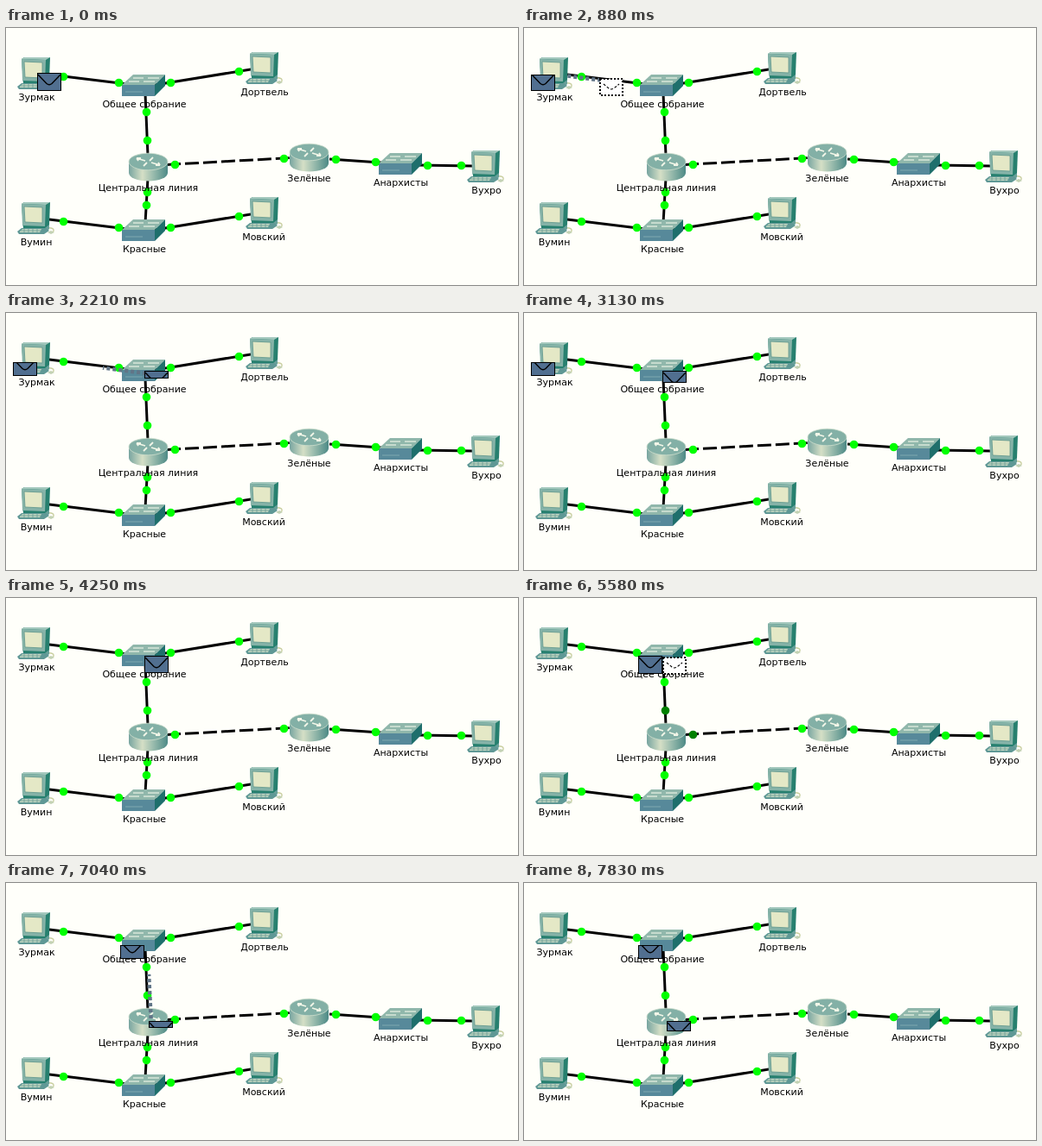
Recreate the animation shown at these times as an HTML page. Size 592 px wide and 298 px high, loop 8 s.

```html
<!DOCTYPE html>
<html lang="ru">
<head>
<meta charset="utf-8">
<style>
html, body { margin: 0; width: 100%; height: 100%; overflow: hidden; background: #fffffa; }
svg { display: block; width: 592px; height: 298px; }
text { font: 11px "DejaVu Sans", sans-serif; text-anchor: middle; fill: #000; }
</style>
</head>
<body>
<svg id="stage" viewBox="0 0 592 298">
  <defs>
    <linearGradient id="metal">
      <stop offset="0" stop-color="#78a5a0"/>
      <stop offset=".35" stop-color="#d5dfc6"/>
      <stop offset=".6" stop-color="#9fbfb0"/>
      <stop offset="1" stop-color="#4d8a86"/>
    </linearGradient>
    <g id="pc">
      <path d="M34 30Q41 29 42 32T37 35" fill="none" stroke="#c9cfa0" stroke-width="1.4"/>
      <path d="M35 35L39 33L43 35L39 37Z" fill="#c3d2b4"/>
      <path d="M6 26H37V31L33 35H10Z" fill="#68a09a"/>
      <path d="M5 2L8 0H38L37 26L32 30H7Z" fill="#27806f"/>
      <path d="M5 2L8 0H38L33 3Z" fill="#a4c8bd"/>
      <path d="M5 2L33 3L32 28L6 27Z" fill="#86b3a8"/>
      <path d="M8 5L29 6V24L9 23Z" fill="#e4e8c6" stroke="#5f968c" stroke-width=".8"/>
      <path d="M0 34L5 30H33L37 33L31 37H2Z" fill="#5f9895"/>
      <path d="M3 34L6 31H28L26 35H3Z" fill="#bfd5c0"/>
      <path d="M4 33H27M8 31V35M13 31V35M18 31V35M23 31V35" stroke="#5f9691" stroke-width=".7"/>
    </g>
    <g id="switch">
      <path d="M0 12L13 0H50L38 12Z" fill="#90b7ab"/>
      <path d="M0 12H38V25H0Z" fill="#57899a"/>
      <path d="M38 12L50 0V13L38 25Z" fill="#1f6f6c"/>
      <path d="M13 4H25M30 4H43M8 8H20M25 8H38" stroke="#d9e8da" stroke-width="1.3"/>
      <path d="M4 20H24" stroke="#7fa9b0"/>
    </g>
    <g id="router">
      <path d="M0 10V23A22.5 9.5 0 0 0 45 23V10Z" fill="url(#metal)"/>
      <ellipse cx="22.5" cy="10" rx="22.5" ry="9.8" fill="#83b0a6" stroke="#cfdfcd" stroke-width=".8"/>
      <path d="M9 6L19 9M36 14L26 11M17 15L21 11M28 5L24 9M9 6H14M9 6L11 9M36 14H31M36 14L34 11" fill="none" stroke="#f2f6e8" stroke-width="1.8"/>
    </g>
  </defs>
  <rect width="592" height="298" fill="#fffffa"/>
  <g id="net"></g>
  <g id="labels"></g>
  <path id="trail" fill="none" stroke="#617587" stroke-width="4.5" stroke-dasharray="4 3"/>
  <g id="ghost">
    <rect x="1" y="1" width="26" height="19" fill="#fff" stroke="#000" stroke-width="2" stroke-dasharray="2 2"/>
    <path d="M5 7L11 12Q14 14 17 12L23 7" fill="none" stroke="#000" stroke-width="1.1" stroke-dasharray="3 2"/>
  </g>
</svg>
<script>
const NS = 'http://www.w3.org/2000/svg';
const LOOP = 8000, TRAVEL = 1060, FILL = 3950, W = 28, H = 21;
const $ = id => document.getElementById(id);

function add(parent, tag, attrs) {
  const el = document.createElementNS(NS, tag);
  set(el, attrs);
  return parent.appendChild(el);
}
function set(el, attrs) {
  for (const k in attrs) el.setAttribute(k, attrs[k]);
}
const show = (el, on) => set(el, { visibility: on ? 'visible' : 'hidden' });
const clamp = v => Math.max(0, Math.min(1, v));
const mix = (a, b, p) => a + (b - a) * p;

// Network map
const net = $('net');
const links = ['M46 53.500L140 65', 'M172 66L286 47.500', 'M161 76L164 148', 'M164 174L161 226',
  'M46 221.500L140 233', 'M172 234L286 215.500', 'M374 152L440 156.500', 'M476 159L540 160'];
add(net, 'path', { d: links.join(''), stroke: '#000', 'stroke-width': 3 });
add(net, 'path', { d: 'M186 158.500L330 150.500', stroke: '#000', 'stroke-width': 3, 'stroke-dasharray': '16 5' });

const devices = {
  pc: [[13, 34], [277, 28], [533, 142], [13, 202], [277, 196]],
  switch: [[134, 54], [431, 145], [134, 222]],
  router: [[142, 145], [328, 134]]
};
for (const kind in devices)
  for (const [x, y] of devices[kind]) add(net, 'use', { href: '#' + kind, x, y });

const lamps = [[163, 130], [195, 158], [66, 56], [130, 63], [190, 63], [269, 50], [162, 97],
  [321, 151], [381, 152], [427, 155], [487, 159], [526, 159], [163, 190], [162, 205],
  [130, 231], [66, 224], [190, 231], [269, 218]
].map(([x, y]) => add(net, 'circle', { cx: x + .5, cy: y + .5, r: 4.8, fill: '#0f0' }));

const names = [['Зурмак', 35.5, 84], ['Общее собрание', 160, 92], ['Дортвель', 299, 78],
  ['Центральная линия', 164.5, 189], ['Зелёные', 350.5, 178], ['Анархисты', 456.5, 183],
  ['Вухро', 555.5, 192], ['Вумин', 35, 252], ['Красные', 160, 260], ['Мовский', 298, 246]];
for (const [name, x, y] of names) add($('labels'), 'text', { x, y }).textContent = name;

// Envelope of which only the rows from top to bottom are visible
function envelope() {
  const box = add($('stage'), 'svg', { width: W, overflow: 'hidden' });
  const face = add(box, 'rect', { x: .5, width: W - 1, fill: '#516f90', stroke: '#000' });
  add(box, 'path', { d: 'M1 2L11 12.500Q14 15 17 12.500L27 2', fill: 'none', stroke: '#000', 'stroke-width': 1.4 });
  return (x, y, top, bottom) => {
    const h = bottom - top;
    show(box, h >= 1);
    if (h < 1) return;
    set(box, { x, y: y + top, height: h, viewBox: `0 ${top} ${W} ${h}` });
    set(face, { y: top + .5, height: h - 1 });
  };
}
const sender = envelope(), receiver = envelope();
$('stage').append($('ghost'));

const hops = [
  { start: 515, from: [36, 52], to: [160, 67], wire: [50, 55.5, 162, 70] },
  { start: 5575, from: [160, 67], to: [165, 160], wire: [163.5, 74, 168, 164] }
];
const glide = u => 1 - Math.pow(1 - clamp(u), 1.25);

function draw(t) {
  const hop = t < 5040 ? hops[0] : hops[1];
  const age = t - hop.start;
  const [x0, y0] = hop.from, [x1, y1] = hop.to;
  const moving = age >= 0 && age < TRAVEL;
  const head = glide(age / TRAVEL);
  const tail = clamp((age - TRAVEL) / 1150);

  if (age < 0) {
    sender(x0, y0, 0, H);
    receiver(x1, y1, 0, 0);
  } else {
    const drained = Math.round(5 * clamp(age / TRAVEL) + 16 * clamp((age - 2770) / 590));
    sender(x0 - W, y0, drained, H);
    receiver(x1, y1, 0, moving ? 0 : Math.round(H * clamp(age / FILL)));
  }

  show($('ghost'), moving);
  set($('ghost'), { transform: `translate(${Math.round(mix(x0, x1, head))} ${Math.round(mix(y0, y1, head))})` });

  const [ax, ay, bx, by] = hop.wire;
  const at = p => mix(ax, bx, p) + ' ' + mix(ay, by, p);
  show($('trail'), age >= 0 && tail < 1);
  // Drawn from the head so that the dashes run along with it
  set($('trail'), { d: `M${at(head)}L${at(tail)}` });

  const dim = t >= 5060 && t < 5800;
  for (const lamp of lamps.slice(0, 2)) set(lamp, { fill: dim ? '#008000' : '#0f0' });
}

const began = performance.now();
function tick() {
  draw((performance.now() - began) % LOOP);
  requestAnimationFrame(tick);
}
tick();
</script>
</body>
</html>
```
